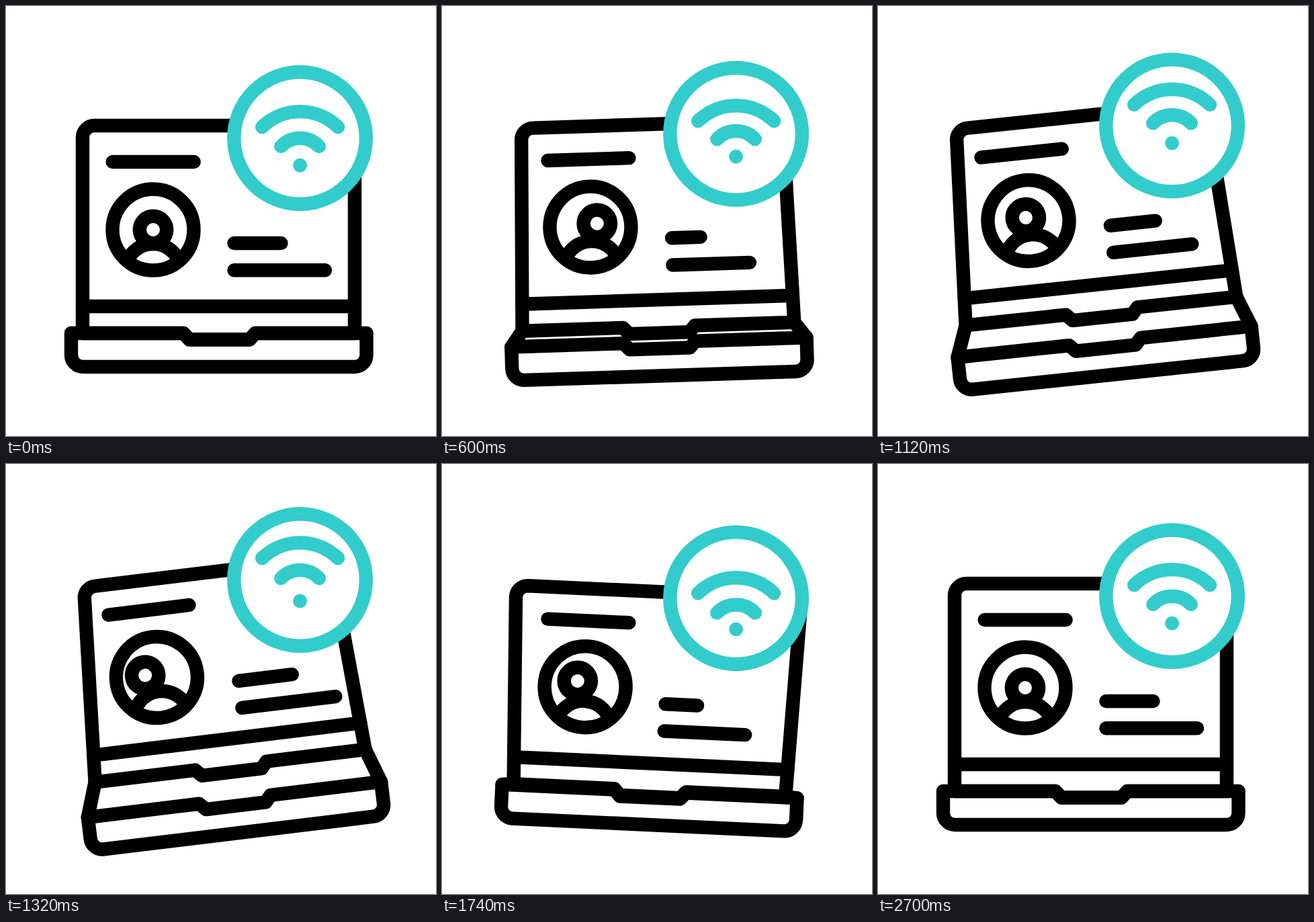
These frames come from a looping animation (640 px wide and 640 px high, 3 s). An HTML page:

```html
<!DOCTYPE html>
<html lang="en">
<head>
<meta charset="utf-8">
<title>Laptop profile</title>
<style>
  html, body { margin: 0; width: 100%; height: 100%; overflow: hidden; background: #fff; }
  svg { display: block; width: 100vw; height: 100vh; }
  path, circle { fill: none; stroke-width: 20.4; stroke-linecap: round; stroke-linejoin: round; }
  #laptop { stroke: #000; }
  #badge { stroke: #3cc; }
  #badge .disc { fill: #fff; }
  #badge .dot { fill: #3cc; stroke: none; }
</style>
</head>
<body>
<svg viewBox="0 0 640 640">
  <defs><clipPath id="face"><circle r="62"/></clipPath></defs>
  <g id="laptop">
    <path id="lid"/>
    <path id="keyboard"/>
    <path id="base"/>
    <path id="divider"/>
    <path id="title"/>
    <path id="lineA"/>
    <path id="lineB"/>
    <g id="avatar">
      <circle r="60.5"/>
      <g clip-path="url(#face)"><circle cy="63" r="42"/></g>
      <circle id="head" r="20.2"/>
    </g>
  </g>
  <g id="badge">
    <circle class="disc" r="98.3"/>
    <path id="bigArc" d="M-56.5 -16.5A81 81 0 0 1 56.5 -16.5"/>
    <path id="smallArc" d="M-28.3 12.3A39 39 0 0 1 28.3 12.3"/>
    <circle id="dot" class="dot" cy="40.5" r="10.4"/>
  </g>
</svg>
<script>
const LOOP = 3000;
const START = 200, BACK = 1400, FORTH = 1780, REST = 2100, END = 2700;
const CORNER = 17.5;
const $ = id => document.getElementById(id);

const smooth = s => s * s * (3 - 2 * s);
const rush = s => s ** 1.3;

// Eases from key to key; each key is [time, value, easing towards it].
function keys(...list) {
  return t => {
    const i = list.findIndex(key => key[0] > t);
    if (i === 0) return list[0][1];
    if (i < 0) return list[list.length - 1][1];
    const [t0, v0] = list[i - 1], [t1, v1, ease = smooth] = list[i];
    return v0 + (v1 - v0) * ease((t - t0) / (t1 - t0));
  };
}

// The laptop leans back, swings forth and comes to rest.
const sway = (back, forth) => keys([START, 0], [BACK, back], [FORTH, forth], [REST, 0]);
const opening = keys([START, 0], [600, 1], [BACK, 1], [FORTH, 0]);

const tilt = sway(-7, 2.95);
const shift = sway(1.5, 0);
const lidTop = sway(-21.5, 13.2);
const lidInset = sway(14, -11);
const lidBottom = sway(-37.5, 0);
const contentX = sway(5, -5.6);
const contentY = sway(-27.3, 4.6);

const titleDrop = keys([BACK, 0], [FORTH, 2.7], [2360, 0]);
const headX = keys([START, 0], [800, 13.5], [1420, -19], [2180, 0]);
const headY = keys([START, 0], [600, -5], [BACK, -5], [2150, -12.5], [END, 0]);
const lengthA = keys([START, 70], [760, 36], [1320, 80], [1860, 43], [2600, 70]);
const lengthB = keys([START, 135.5], [920, 100], [1360, 141], [2020, 108], [END, 135.5]);

const badgeY = keys([START, 0], [1390, -26, rush], [1920, 13.5], [2360, 0]);
const wave = (start, peak, up, down) =>
  keys([start, 0], [peak, up], [1850, down], [REST, 0], [2390, -5], [END, 0]);
const waves = {
  dot: wave(START, 1060, -14.7, 7),
  smallArc: wave(START + 80, 1230, -16.5, 12),
  bigArc: wave(START + 160, 1300, -16, 12)
};

const setPath = (id, d) => $(id).setAttribute("d", d);
const move = (id, x, y, extra = "") => $(id).setAttribute("transform", `translate(${x} ${y})${extra}`);
const mix = (a, b, k) => a.map((v, i) => v + (b[i] - v) * k);
const line = points => "M" + points.join("L");
const bar = (id, x, y, length) => setPath(id, `M${x} ${y}h${length}`);
const arcTo = (x, y) => `A${CORNER} ${CORNER} 0 0 1 ${x} ${y}`;

// Edge between two corners with the shallow dip for the thumb.
const notched = (left, right) => {
  const y = left[1], dip = y + 9.5;
  return [left, [-56, y], [-47, dip], [42.5, dip], [51, y], right];
};

function drawShell(t) {
  const open = opening(t);
  const inset = lidInset(t) + 4.5 * open;
  const top = -142 + lidTop(t) + 3.4 * open;
  const bottom = 167 + lidBottom(t);
  const front = 167 + 13.5 * open, floor = front + 50;
  const topLeft = [-206 + inset, top], topRight = [199 - inset, top];
  const hingeLeft = [-206, bottom], hingeRight = [199, bottom];
  const frontLeft = [-223, front], frontRight = [216.5, front];
  const bend = CORNER / (bottom - top);

  setPath("lid", `M${hingeLeft}L${mix(topLeft, hingeLeft, bend)}`
    + arcTo(topLeft[0] + CORNER, top) + `H${topRight[0] - CORNER}`
    + arcTo(...mix(topRight, hingeRight, bend)) + `L${hingeRight}`
    + line(notched(hingeLeft, hingeRight)));
  setPath("keyboard", line([hingeLeft, ...notched(frontLeft, frontRight), hingeRight]));
  setPath("base", `M${frontRight}V${floor - CORNER}` + arcTo(frontRight[0] - CORNER, floor)
    + `H${frontLeft[0] + CORNER}` + arcTo(frontLeft[0], floor - CORNER) + `L${frontLeft}`);

  const k = (bottom - 40 - top) / (bottom - top);
  setPath("divider", line([mix(topLeft, hingeLeft, k), mix(topRight, hingeRight, k)]));
}

function drawContent(t) {
  const x = contentX(t), y = contentY(t);
  bar("title", -161.3 + x, -88 + y + titleDrop(t), 121);
  bar("lineA", 19.5 + x, 33 + y, lengthA(t));
  bar("lineB", 19.5 + x, 73.3 + y, lengthB(t));
  move("avatar", -101 + x, 13 + y);
  move("head", headX(t), headY(t));
}

function drawBadge(t) {
  move("badge", 437.6, 196.6 + badgeY(t));
  for (const id in waves) move(id, 0, waves[id](t));
}

function draw(t) {
  move("laptop", 320, 320, ` rotate(${tilt(t)}) translate(${shift(t)})`);
  drawShell(t);
  drawContent(t);
  drawBadge(t);
}

const start = performance.now();
function tick() {
  draw((performance.now() - start) % LOOP);
  requestAnimationFrame(tick);
}
tick();
</script>
</body>
</html>
```
